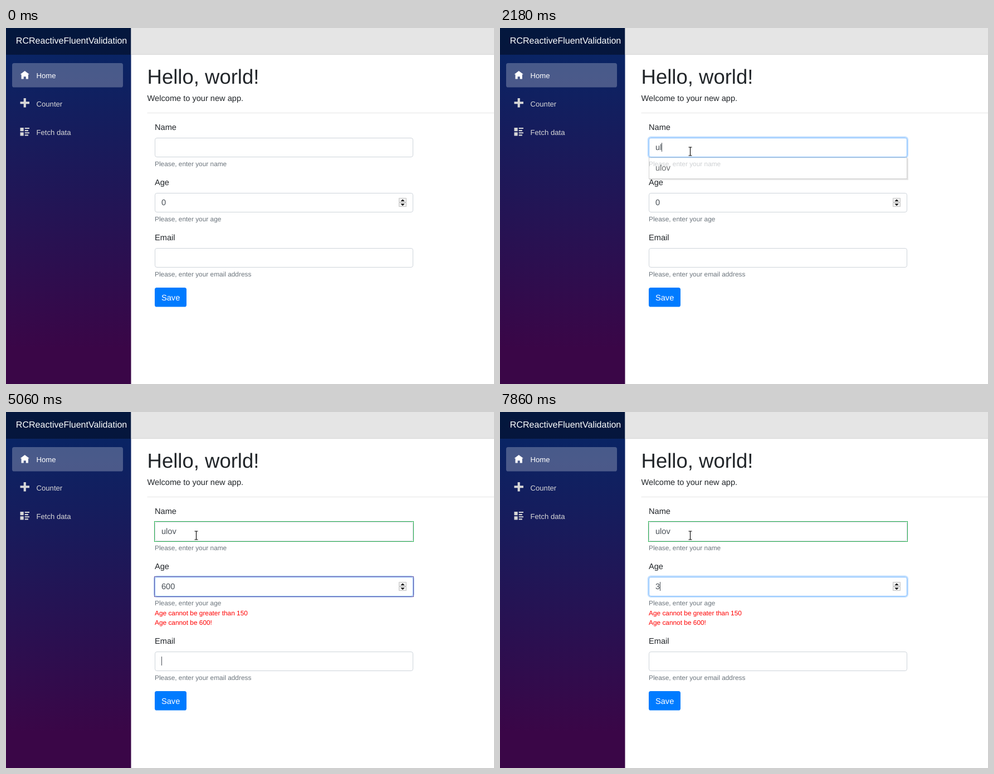
An HTML page for the animation above (8 s loop, 876 by 639 pixels).

```html
<!DOCTYPE html>
<html lang="en">
<head>
<meta charset="utf-8">
<title>Form validation</title>
<style>
  html, body { margin: 0; width: 100%; height: 100%; overflow: hidden; background: #fff; }
  svg { display: block; width: 876px; height: 639px; }
  text { font: 14.6px "Liberation Sans", Arial, sans-serif; fill: #212529; text-rendering: geometricPrecision; }
  .brand { font-size: 16.06px; fill: #fff; }
  .nav text { font-size: 13.14px; fill: #d7d7d7; }
  .nav path { fill: #d7d7d7; }
  .nav .active { fill: #fff; }
  .title { font-size: 36.5px; }
  .hint { font-size: 11.86px; fill: #6c757d; }
  .error { font-size: 11.86px; fill: #f00; }
  .ring { fill: none; stroke: #007bff; stroke-opacity: .25; stroke-width: 2.6; }
  .outline { fill: none; }
  .value { fill: #495057; }
  .caret { stroke: #495057; }
</style>
</head>
<body>
<svg viewBox="0 0 876 639">
  <defs>
    <linearGradient id="side" gradientUnits="userSpaceOnUse" x1="0" y1="0" x2="0" y2="575">
      <stop stop-color="#052767"/><stop offset="1" stop-color="#3a0647"/>
    </linearGradient>
  </defs>

  <rect width="224.5" height="639" fill="url(#side)"/>
  <rect width="224.5" height="48" fill-opacity=".4"/>
  <text class="brand" x="17.8" y="28">RCReactiveFluentValidation</text>
  <g class="nav">
    <rect x="11" y="63" width="199" height="43.5" rx="3.6" fill="#fff" fill-opacity=".25"/>
    <path class="active" transform="translate(25.5 77) scale(2.06)" d="M4 0l-4 3h1v4h2v-2h2v2h2v-4h1z"/>
    <path transform="translate(25.5 126) scale(2.06)" d="M3 0v3h-3v2h3v3h2v-3h3v-2h-3v-3z"/>
    <path transform="translate(25.5 179) scale(2.06)" d="M0 0h3v3h-3zM4 0h4v1h-4zM4 2h3v1h-3zM0 4h3v3h-3zM4 4h4v1h-4zM4 6h3v1h-3z"/>
    <text class="active" x="54.5" y="89.5">Home</text>
    <text x="54.5" y="140.5">Counter</text>
    <text x="54.5" y="191.5">Fetch data</text>
  </g>

  <rect x="224.5" width="651.5" height="47" fill="#e5e5e5"/>
  <rect x="224.5" y="47" width="651.5" height="1" fill="#d6d5d5"/>
  <text class="title" x="253.6" y="99.5">Hello, world!</text>
  <text x="253.6" y="131">Welcome to your new app.</text>
  <rect x="253.5" y="152" width="622.5" height="1" fill="#e5e5e5"/>

  <g id="form"></g>
  <g id="errors">
    <text class="error" x="267" y="365">Age cannot be greater than 150</text>
    <text class="error" x="267" y="382">Age cannot be 600!</text>
  </g>
  <g id="save">
    <rect x="267" y="466" width="57" height="34.5" rx="3.6" fill="#007bff"/>
    <text x="279" y="488.5" style="fill:#fff">Save</text>
  </g>
  <g id="spinner">
    <path d="M705.5 305.5h13v7h-13zM705.5 313.5h13v7h-13z" fill="#f0f0f0" stroke="#c4c4c4"/>
    <path d="M708.5 311l3.5-3.5 3.5 3.5zM708.5 315.5l3.5 3.5 3.5-3.5z"/>
  </g>
  <g id="popup">
    <rect x="268" y="234" width="465" height="39" fill-opacity=".15"/>
    <rect x="267.5" y="232.5" width="463" height="38" fill="#fff" stroke="#bbb"/>
    <text x="279" y="256">ulov</text>
  </g>
  <path id="arrow" d="M0 0v15l3.5-3.2 2.3 5.2 2-1-2.2-5h4.8z" fill="#fff" stroke="#000" stroke-width=".9"/>
  <path id="beam" d="M-3-7.5h2.5l.5.5.5-.5h2.5M0-7v14M-3 7.5h2.5l.5-.5.5.5h2.5" fill="none" stroke="#000" stroke-width="1.1"/>
</svg>
<script>
const LOOP = 8000, FADE = 140, SHIFT = 35;
const $ = id => document.getElementById(id);
const clamp = v => Math.min(1, Math.max(0, v));
const within = (t, [a, b]) => t >= a && t < b;
const show = (el, opacity) => el.setAttribute('opacity', +opacity);
const move = (el, x, y) => el.setAttribute('transform', `translate(${x} ${y})`);
const mix = (a, b, k) => `rgb(${a.map((v, i) => v + (b[i] - v) * k)})`;

// Latest value of a [time, value] list
const at = (steps, t, first) => steps.reduce((v, [time, next]) => t >= time ? next : v, first);

const fields = [
  { label: 'Name', hint: 'name', y: 197, focus: [[640, 3130]],
    typed: [[1720, 'u'], [2120, 'ul'], [2270, 'ulo'], [2570, 'ulov']],
    blinks: [[640, 1250], [1720, 2810]], selected: [],
    states: [[3200, '#26b050']] },
  { label: 'Age', hint: 'age', y: 296, focus: [[3130, 5060], [6780, LOOP + FADE]],
    typed: [[0, '0'], [4280, '6'], [4670, '60'], [4830, '600'], [7860, '3']],
    blinks: [[4280, 5060], [7860, LOOP]], selected: [[3200, 4280], [6780, 7860]],
    states: [[5060, '#7058a0'], [5140, '#e0202c'], [6780, 'none']] },
  { label: 'Email', hint: 'email address', y: 395, focus: [[5060, 6780]],
    typed: [], blinks: [[5060, 5600], [6080, 6620]], selected: [], states: [] }
];

for (const f of fields) {
  const g = document.createElementNS('http://www.w3.org/2000/svg', 'g');
  g.innerHTML = `
    <text x="267" y="-14">${f.label}</text>
    <rect class="ring" x="266" y="-1.2" width="465.8" height="36.9" rx="4.8"/>
    <rect class="box" x="267.5" y=".5" width="463" height="34" rx="3.4" fill="#fff"/>
    <rect class="outline" x="266.5" y="-.5" width="465" height="36"/>
    <rect class="mark" x="279" y="9" height="16" fill="#0078d7"/>
    <text class="value" x="279" y="22"></text>
    <path class="caret" d="M.5 9v16"/>
    <text class="hint" x="267" y="51">Please, enter your ${f.hint}</text>`;
  $('form').append(g);
  f.group = g;
  f.part = {};
  for (const el of g.querySelectorAll('[class]')) f.part[el.getAttribute('class')] = el;
}

function drawField(f, t, dy) {
  const { ring, box, outline, mark, value, caret } = f.part;
  const on = spans => spans.some(span => within(t, span));
  move(f.group, 0, f.y + dy);

  const glow = f.focus.reduce((sum, [a, b]) => sum + clamp((t - a) / FADE) - clamp((t - b) / FADE), 0);
  show(ring, glow);
  box.setAttribute('stroke', mix([206, 212, 218], [128, 189, 255], glow));
  outline.setAttribute('stroke', at(f.states, t, 'none'));

  const text = at(f.typed, t, ''), marked = on(f.selected);
  if (value.textContent !== text) value.textContent = text;
  const width = text ? value.getComputedTextLength() : 0;
  value.style.fill = marked ? '#fff' : '';
  mark.setAttribute('width', marked ? width : 0);
  show(caret, on(f.blinks));
  move(caret, Math.round(279 + width), 0);
}

function drawMouse(t) {
  const p = clamp(Math.floor((t - 100) / 75) / 7), k = 1 - (1 - p) ** 2;
  const x = 735 - 393.5 * k, y = 611 - 389.5 * k, overInput = y < 231;
  show($('arrow'), t >= 100 && !overInput);
  show($('beam'), overInput);
  move($('arrow'), x, y);
  move($('beam'), x, y);
}

function draw(t) {
  const invalid = t >= 5060, dy = invalid ? SHIFT : 0;
  fields.forEach(f => drawField(f, t, f.label === 'Email' ? dy : 0));
  show($('errors'), invalid);
  move($('save'), 0, dy);
  const step = start => clamp((1 + Math.floor((t - start) / 75)) / 3);
  show($('popup'), step(1720) - step(2120));
  drawMouse(t);
}

const start = performance.now();
function tick() {
  draw((performance.now() - start) % LOOP);
  requestAnimationFrame(tick);
}
tick();
</script>
</body>
</html>
```
